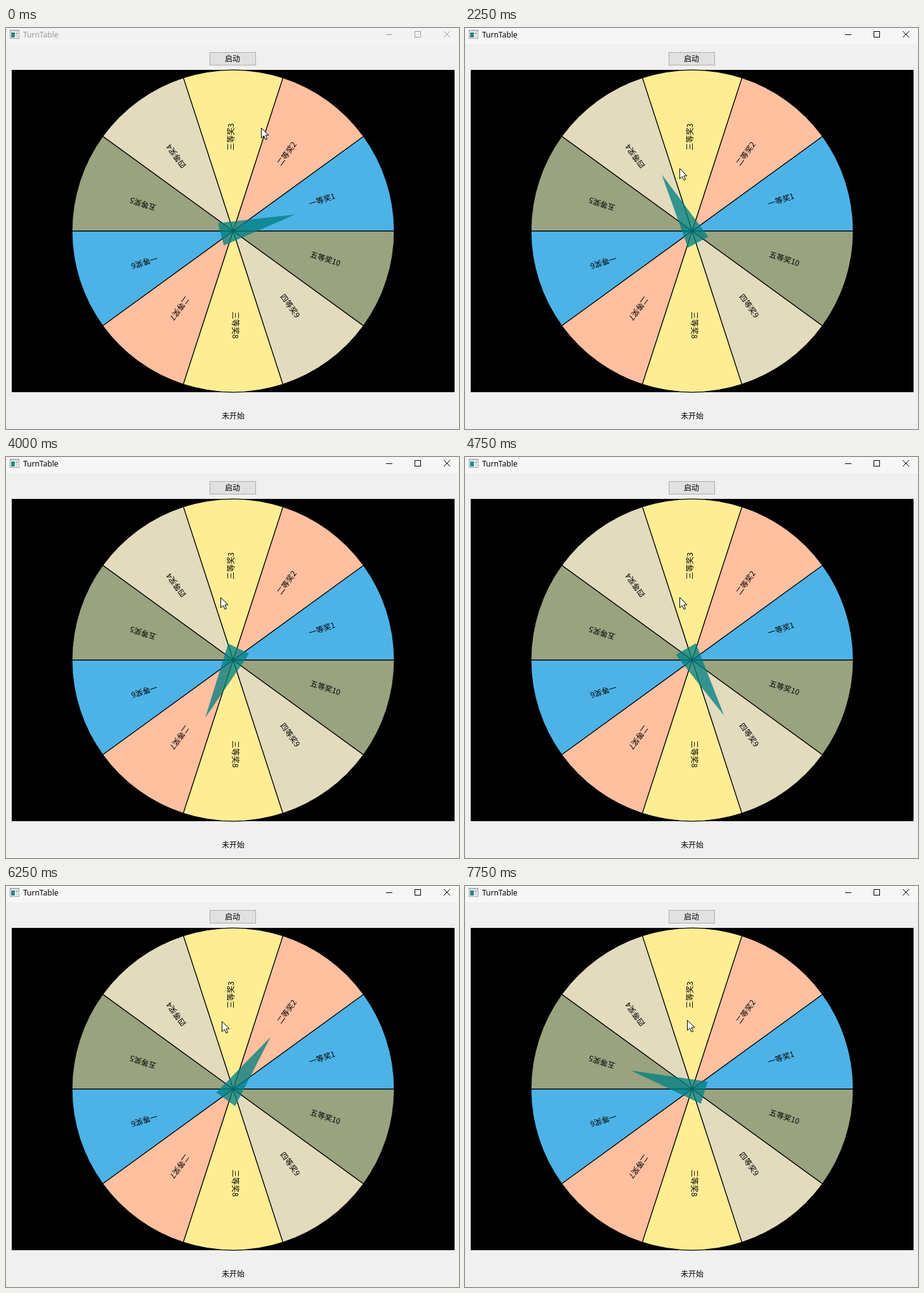
These frames come from a looping animation (714x632 px, 8 s). An HTML page with a canvas:

```html
<!DOCTYPE html>
<html lang="zh">
<head>
<meta charset="utf-8">
<title>TurnTable</title>
<style>
html, body { margin: 0; width: 100%; height: 100%; overflow: hidden; background: #f0f0f0; }
canvas { display: block; }
</style>
</head>
<body>
<canvas id="stage" width="714" height="632"></canvas>
<script>
const ctx = document.getElementById('stage').getContext('2d');
const LOOP = 8000, STEP = 250;
const CENTER = { x: 358, y: 320 }, RADIUS = 254;
const SLICE = Math.PI / 5;
const COLORS = ['#4db3e7', '#ffc0a0', '#ffed94', '#e2dbbe', '#9aa380'];
const RANKS = '一二三四五';
const CJK = '"Noto Sans CJK SC", "Noto Sans CJK", "Noto Sans CJK JP", sans-serif';

// Key poses: [ms, value...]
const NEEDLE = [[0, 14.9], [750, 25], [1250, 47.8], [2250, 118.3], [4000, 244.2],
  [4750, 299.9], [6250, 414.3], [7750, 523.2]];
const POINTER = [[0, 402, 157], [1000, 338, 221], [5500, 338, 221],
  [6250, 340, 213], [7500, 350, 211]];
const ACTIVATED = 500;

function at(keys, t) {
  const i = keys.findIndex(k => k[0] > t);
  if (i < 0) return keys[keys.length - 1].slice(1);
  const a = keys[i - 1], b = keys[i], f = (t - a[0]) / (b[0] - a[0]);
  return a.slice(1).map((v, n) => v + (b[n + 1] - v) * f);
}

function rect(x, y, w, h, color) {
  ctx.fillStyle = color;
  ctx.fillRect(x, y, w, h);
}

function frame(x, y, w, h, color) {
  ctx.strokeStyle = color;
  ctx.lineWidth = 1;
  ctx.strokeRect(x + .5, y + .5, w - 1, h - 1);
}

function label(text, x, y, align = 'center', font = CJK, color = '#000') {
  ctx.font = '12px ' + font;
  ctx.textAlign = align;
  ctx.textBaseline = 'alphabetic';
  ctx.fillStyle = color;
  ctx.fillText(text, x, y);
}

function polygon(...points) {
  ctx.beginPath();
  points.forEach(([x, y]) => ctx.lineTo(x, y));
  ctx.closePath();
}

function drawTitleBar(active) {
  const ink = active ? '#000' : '#999';
  rect(0, 0, 714, active ? 26 : 27, active ? '#f6f6f6' : '#f3f3f3');

  rect(6, 3, 15, 14, '#fff');
  frame(6, 3, 15, 14, '#9a9fa3');
  rect(7, 4, 13, 2, '#c9d2d8');
  rect(8, 7, 6, 8, '#2f8583');
  rect(15, 7, 4, 3, '#b5bcc1');
  rect(15, 11, 4, 4, '#d5d9dc');

  label('TurnTable', 27, 15, 'left', '"Noto Sans", sans-serif', ink);

  rect(599, 10, 10, 1, ink);
  frame(644, 5, 10, 10, ink);
  ctx.beginPath();
  ctx.moveTo(690, 5); ctx.lineTo(700, 15);
  ctx.moveTo(700, 5); ctx.lineTo(690, 15);
  ctx.stroke();
}

function drawWheel() {
  rect(9, 66, 698, 508, '#000');
  ctx.save();
  ctx.translate(CENTER.x, CENTER.y);
  ctx.strokeStyle = '#000';
  ctx.lineWidth = 1.25;
  for (let i = 0; i < 10; i++) {
    ctx.beginPath();
    ctx.moveTo(0, 0);
    ctx.arc(0, 0, RADIUS, -i * SLICE, -(i + 1) * SLICE, true);
    ctx.closePath();
    ctx.fillStyle = COLORS[i % 5];
    ctx.fill();
    ctx.stroke();
  }
  for (let i = 0; i < 10; i++) {
    ctx.save();
    ctx.rotate(-(i + .5) * SLICE);
    label(RANKS[i % 5] + '等奖' + (i + 1), 127, 1, 'left');
    ctx.restore();
  }
  ctx.restore();
}

function drawNeedle(degrees) {
  ctx.save();
  ctx.translate(CENTER.x, CENTER.y);
  ctx.rotate(-degrees * Math.PI / 180);
  polygon([101, 0], [-20, -18.3], [-20, 18.3]);
  ctx.fillStyle = 'rgba(0, 128, 128, .77)';
  ctx.fill();
  ctx.restore();
}

function drawPointer(x, y) {
  ctx.save();
  ctx.translate(Math.round(x) + .5, Math.round(y) + .5);
  polygon([0, 0], [0, 16], [4, 12.5], [6.5, 18.5], [9, 17.5], [6.5, 11.5], [11.5, 11.5]);
  ctx.fillStyle = '#fff';
  ctx.fill();
  ctx.strokeStyle = '#000';
  ctx.lineWidth = 1;
  ctx.stroke();
  ctx.restore();
}

function draw(now) {
  const t = Math.floor(now % LOOP / STEP) * STEP;
  rect(0, 0, 714, 632, '#f0f0f0');
  drawTitleBar(t >= ACTIVATED);
  rect(321, 38, 73, 21, '#e1e1e1');
  frame(321, 38, 73, 21, '#adadad');
  label('启动', 357, 53);
  drawWheel();
  drawNeedle(at(NEEDLE, t)[0]);
  label('未开始', 358, 616);
  drawPointer(...at(POINTER, t));
}

const start = performance.now();
function tick() {
  draw(performance.now() - start);
  requestAnimationFrame(tick);
}
tick();
</script>
</body>
</html>
```
